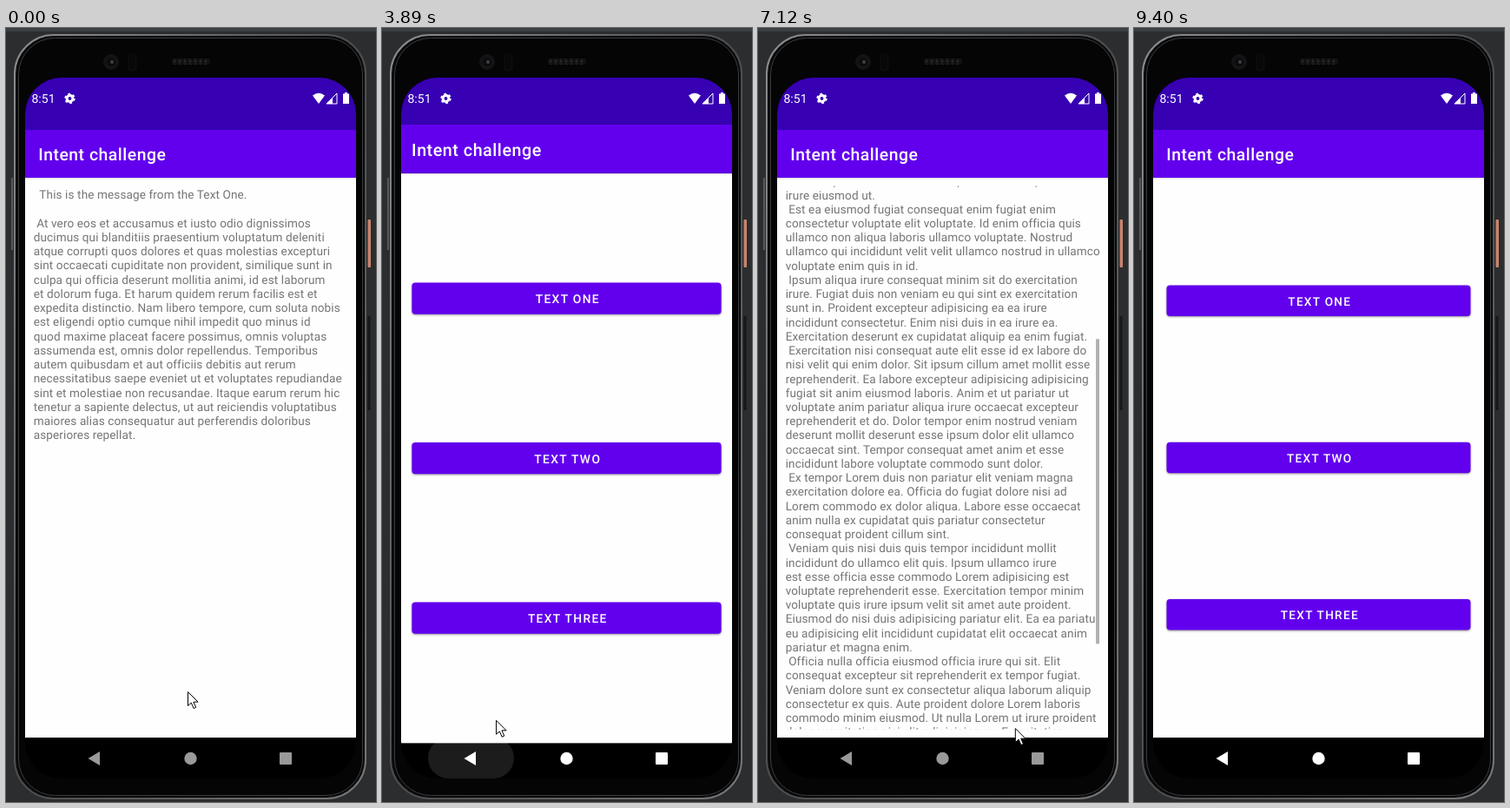
Write an HTML page that moves like this. It is 426 by 889 pixels and loops after 9680 ms.

```html
<!DOCTYPE html>
<html lang="en">
<head>
<meta charset="utf-8">
<style>
  html, body { margin: 0; height: 100%; overflow: hidden; background: #2b2d2f; }
  svg { display: block; width: 426px; height: 889px; }
  text { font-family: Roboto, sans-serif; white-space: pre; text-rendering: geometricPrecision; }
  .title { font-size: 19.4px; font-weight: 500; letter-spacing: .5px; fill: #fff; }
  .label { font-size: 13.6px; font-weight: 500; letter-spacing: .096em; fill: #fff; text-anchor: middle; }
  .body { font-size: 13.58px; letter-spacing: .1px; fill: #757575; }
  .button rect { fill: #6200ee; filter: drop-shadow(0 1px 1px #0006); }
  .pressed rect { fill: #893ff2; filter: drop-shadow(0 3px 3px #0006); }
</style>
</head>
<body>
<svg viewBox="0 0 426 889">
  <defs>
    <clipPath id="screen"><rect x="22" y="57" width="381" height="805" rx="42"/></clipPath>
    <clipPath id="viewport"><rect x="30" y="181.5" width="365" height="624"/></clipPath>
    <linearGradient id="rim" x2="1" y2="1">
      <stop stop-color="#8d8e90"/><stop offset=".5" stop-color="#4b4c4e"/><stop offset="1" stop-color="#77787a"/>
    </linearGradient>
    <linearGradient id="bar" x2="0" y2="1">
      <stop stop-color="#000" stop-opacity=".16"/><stop offset="1" stop-color="#000" stop-opacity="0"/>
    </linearGradient>
    <pattern id="mesh" width="6" height="4" patternUnits="userSpaceOnUse">
      <rect width="6" height="4" fill="#101010"/><circle cx="2" cy="2" r="1.5" fill="#282828"/>
    </pattern>
    <g id="chrome">
      <rect x="22" y="57" width="381" height="805"/>
      <rect x="22" y="172" width="381" height="643" fill="#fefefe"/>
      <rect x="22" y="57" width="381" height="60" fill="#3700b3"/>
      <rect x="22" y="117" width="381" height="55" fill="#6200ee"/>
      <rect x="22" y="172" width="381" height="2" fill="url(#bar)"/>
      <text class="title" x="37.2" y="152.3">Intent challenge</text>
    </g>
  </defs>

  <rect width="426" height="889" fill="#2b2d2f"/>
  <rect width="426" height="4" fill="#3c3f41"/>
  <path d="M7 172V255" stroke="#58595b" stroke-width="2"/>
  <rect x="416.5" y="331" width="3" height="108" rx="1" fill="#161718"/>
  <rect x="416.5" y="220" width="3.5" height="55" rx="1" fill="#c9826b"/>
  <rect x="10" y="8" width="404" height="877" rx="45" fill="#0a0a0b" stroke="url(#rim)" stroke-width="2"/>
  <rect x="14.5" y="11.5" width="396" height="870" rx="42" fill="#050506" stroke="#3b3c3e"/>
  <circle cx="121" cy="39" r="9" fill="#141415"/>
  <circle cx="121" cy="39" r="5" fill="#0b0c0e"/>
  <circle cx="122" cy="39" r="2" fill="#3b4247"/>
  <rect x="141" y="30" width="9" height="19" rx="4" fill="#080809" stroke="#111112"/>
  <rect x="191" y="35" width="44" height="7" rx="3" fill="url(#mesh)"/>

  <g clip-path="url(#screen)">
    <g id="pages"></g>
    <rect id="ripple" x="53" y="815" width="99" height="47" rx="23.5" fill="#fff"/>
    <g fill="#fff">
      <text x="29.5" y="86.3" font-size="14">8:51</text>
      <circle cx="73.5" cy="81" r="3.4" fill="none" stroke="#fff" stroke-width="3"/>
      <circle cx="73.5" cy="81" r="5.2" fill="none" stroke="#fff" stroke-width="2" stroke-dasharray="2.7 2.745"/>
      <path d="M353 77.5Q360 72 367 77.5L360 87Z"/>
      <path d="M381 75V87H369Z" fill="none" stroke="#fff"/>
      <path d="M376 80V87H369Z"/>
      <path d="M388 75.5H390V74H393V75.5H395V87H388Z"/>
    </g>
    <g id="nav">
      <path d="M94.5 839L108 831V847Z"/>
      <circle cx="212.5" cy="839" r="7.2"/>
      <rect x="315" y="832" width="14" height="14" rx="1"/>
    </g>
  </g>
  <path id="cursor" d="M0 0V16L3.8 12.6L6.6 19L9.2 17.8L6.4 11.6H11.6Z" fill="#fff" stroke="#000"/>
</svg>

<script>
const LOOP = 9680, LINE = 16.23, FADE = 450;
const $ = id => document.getElementById(id);

const texts = [
`  This is the message from the Text One.

 At vero eos et accusamus et iusto odio dignissimos
ducimus qui blanditiis praesentium voluptatum deleniti
atque corrupti quos dolores et quas molestias excepturi
sint occaecati cupiditate non provident, similique sunt in
culpa qui officia deserunt mollitia animi, id est laborum
et dolorum fuga. Et harum quidem rerum facilis est et
expedita distinctio. Nam libero tempore, cum soluta nobis
est eligendi optio cumque nihil impedit quo minus id
quod maxime placeat facere possimus, omnis voluptas
assumenda est, omnis dolor repellendus. Temporibus
autem quibusdam et aut officiis debitis aut rerum
necessitatibus saepe eveniet ut et voluptates repudiandae
sint et molestiae non recusandae. Itaque earum rerum hic
tenetur a sapiente delectus, ut aut reiciendis voluptatibus
maiores alias consequatur aut perferendis doloribus
asperiores repellat.`,
`  This is the message from the Text Two.

 Sed ut perspiciatis unde omnis iste natus error sit
voluptatem accusantium doloremque laudantium, totam
rem aperiam, eaque ipsa quae ab illo inventore veritatis
et quasi architecto beatae vitae dicta sunt explicabo.
Nemo enim ipsam voluptatem quia voluptas sit aspernatur
aut odit aut fugit, sed quia consequuntur magni dolores
eos qui ratione voluptatem sequi nesciunt. Neque porro
quisquam est, qui dolorem ipsum quia dolor sit amet,
consectetur, adipisci velit, sed quia non numquam eius
modi tempora incidunt ut labore et dolore magnam
aliquam quaerat voluptatem. Ut enim ad minima veniam,
quis nostrum exercitationem ullam corporis suscipit
laboriosam, nisi ut aliquid ex ea commodi consequatur.`,
` This is the message from the Text Three.

 Nostrud esse ex fugiat elit consequat deserunt et proident
quis eiusmod duis eiusmod officia.Tempor adipisicing quis
proident labore consectetur magna consequat sit et sit
officia proident excepteur pariatur. Incididunt ea ex pariatur
tempor officia dolor Lorem laborum in magna sint anim
commodo. Voluptate anim elit sunt anim aliqua ea aute.
Reprehenderit commodo fugiat ipsum ex sint aliqua aute
anim cupidatat excepteur eu. Duis voluptate quis esse non
consectetur deserunt amet. Ipsum velit esse duis amet
consectetur ad enim enim mollit.
 Exercitation id veniam laborum consequat aliqua
consequat irure proident pariatur ea magna est aliquip
cupidatat. Magna et eu minim duis proident sint est irure
adipisicing. Incididunt tempor adipisicing id eu exercitation
mollit proident tempor reprehenderit minim consequat
dolore velit eu. Sint irure adipisicing Lorem id dolor ea
cillum incididunt dolor nisi. Duis reprehenderit proident
est velit ipsum consectetur excepteur officia reprehenderit
irure eiusmod ut.
 Est ea eiusmod fugiat consequat enim fugiat enim
consectetur voluptate elit voluptate. Id enim officia quis
ullamco non aliqua laboris ullamco voluptate. Nostrud
ullamco qui incididunt velit velit ullamco nostrud in ullamco
voluptate enim quis in id.
 Ipsum aliqua irure consequat minim sit do exercitation
irure. Fugiat duis non veniam eu qui sint ex exercitation
sunt in. Proident excepteur adipisicing ea ea irure
incididunt consectetur. Enim nisi duis in ea irure ea.
Exercitation deserunt ex cupidatat aliquip ea enim fugiat.
 Exercitation nisi consequat aute elit esse id ex labore do
nisi velit qui enim dolor. Sit ipsum cillum amet mollit esse
reprehenderit. Ea labore excepteur adipisicing adipisicing
fugiat sit anim eiusmod laboris. Anim et ut pariatur ut
voluptate anim pariatur aliqua irure occaecat excepteur
reprehenderit et do. Dolor tempor enim nostrud veniam
deserunt mollit deserunt esse ipsum dolor elit ullamco
occaecat sint. Tempor consequat amet anim et esse
incididunt labore voluptate commodo sunt dolor.
 Ex tempor Lorem duis non pariatur elit veniam magna
exercitation dolore ea. Officia do fugiat dolore nisi ad
Lorem commodo ex dolor aliqua. Labore esse occaecat
anim nulla ex cupidatat quis pariatur consectetur
consequat proident cillum sint.
 Veniam quis nisi duis quis tempor incididunt mollit
incididunt do ullamco elit quis. Ipsum ullamco irure
est esse officia esse commodo Lorem adipisicing est
voluptate reprehenderit esse. Exercitation tempor minim
voluptate quis irure ipsum velit sit amet aute proident.
Eiusmod do nisi duis adipisicing pariatur elit. Ea ea pariatur
eu adipisicing elit incididunt cupidatat elit occaecat anim
pariatur et magna enim.
 Officia nulla officia eiusmod officia irure qui sit. Elit
consequat excepteur sit reprehenderit ex tempor fugiat.
Veniam dolore sunt ex consectetur aliqua laborum aliquip
consectetur ex quis. Aute proident dolore Lorem laboris
commodo minim eiusmod. Ut nulla Lorem ut irure proident
dolor exercitation nisi elit adipisicing ex. Exercitation
minim veniam aute sunt labore in ipsum.
 Culpa sint nostrud elit amet ea duis magna velit
tempor. Anim laboris et aliqua non cillum dolore irure
consequat. Quis enim proident ullamco ex do fugiat
officia mollit, sit nisi voluptate esse labore. Aliquip
incididunt Lorem ad minim pariatur eu tempor.
 Sunt reprehenderit qui deserunt ex amet commodo
laborum. Elit duis magna veniam occaecat nulla irure
cupidatat et dolor sint aliqua. Nisi velit excepteur
ad enim mollit.`];

// [open, close] of each message page
const visits = [[-1000, 950], [2378, 3760], [4800, 8800]];
const cursorPath = [[120, 209, 762], [420, 107, 850], [1200, 107, 850], [1800, 145, 580], [2110, 145, 580],
  [2300, 167, 500], [2500, 167, 500], [3070, 125, 826], [3200, 125, 826], [3480, 107, 850], [3720, 107, 850],
  [3890, 131, 795], [4170, 150, 725], [4320, 150, 725], [4600, 162, 693], [5100, 162, 695], [5250, 170, 806],
  [5480, 175, 822], [6050, 215, 400], [6490, 235, 400], [6850, 285, 624], [7120, 296, 804], [7480, 230, 824],
  [7600, 230, 824], [8020, 163, 843], [8400, 107, 851], [8800, 107, 851], [9300, 398, 880]];
const scrollPath = [[5480, 0], [6050, 420], [6490, 505], [6850, 505], [7120, 325], [7480, 90], [7600, 60], [8020, 6], [8300, 0]];

const clamp = v => Math.min(1, Math.max(0, v));
const ramp = (t, start, length) => clamp((t - start) / length);
const settle = p => 1 - (1 - p) ** 5;
const pulse = (t, start, end) => Math.min(ramp(t, start, 80), 1 - ramp(t, end, 200));

function along(path, t) {
  const i = path.findIndex(key => key[0] > t);
  if (i === 0) return path[0].slice(1);
  if (i < 0) return path.at(-1).slice(1);
  const [a, b] = [path[i - 1], path[i]], p = (t - a[0]) / (b[0] - a[0]);
  return a.slice(1).map((v, k) => v + (b[k + 1] - v) * p);
}

const button = (name, i) => {
  const y = 295.5 + i * 180.3;
  return `<g class="button"><rect x="37.5" y="${y}" width="350" height="35.5" rx="4"/>
    <text class="label" x="213.8" y="${y + 23}">${name}</text></g>`;
};
const message = text => `<g clip-path="url(#viewport)"><text class="body">${
  text.split('\n').map((line, i) => `<tspan x="31.7" y="${196.3 + i * LINE}">${line}</tspan>`).join('')}</text></g>`;
const page = content => `<g><use href="#chrome"/>${content}</g>`;

$('pages').innerHTML =
  page(['TEXT ONE', 'TEXT TWO', 'TEXT THREE'].map(button).join('')) +
  texts.map(text => page(message(text))).join('');
const [home, ...messages] = $('pages').children;
const buttons = home.querySelectorAll('.button');
const longText = messages[2].querySelector('text');
messages[2].insertAdjacentHTML('beforeend', '<rect id="thumb" x="389" width="4" height="350" fill="#b1b1b1"/>');

const show = (node, visible) => { node.style.display = visible ? '' : 'none'; };

function zoom(node, scale) {
  node.setAttribute('transform', `translate(212.5 459.5) scale(${scale}) translate(-212.5 -459.5)`);
}

function draw(t) {
  let homeScale = 1, covered = false;
  visits.forEach(([open, close], i) => {
    const entering = settle(ramp(t, open, FADE)), leaving = settle(ramp(t, close, FADE));
    const alpha = ramp(t, open + 20, 100) * (1 - ramp(t, close, 110));
    show(messages[i], alpha);
    messages[i].setAttribute('opacity', alpha);
    zoom(messages[i], .85 + .15 * entering - .1 * leaving);
    if (t >= close) homeScale = 1.1 - .1 * leaving;
    else if (t >= open) homeScale = 1 + .15 * entering;
    covered ||= alpha === 1 && entering > .95;
  });
  zoom(home, homeScale);
  show(home, !covered);
  buttons[1].classList.toggle('pressed', t > 2270 && t < 2700);
  buttons[2].classList.toggle('pressed', t > 4680 && t < 5200);

  const [scroll] = along(scrollPath, t);
  longText.setAttribute('transform', `translate(0 ${-scroll})`);
  $('thumb').setAttribute('y', 181.5 + scroll * .542);
  $('thumb').setAttribute('opacity', 1 - ramp(t, 8350, 250));

  const press = Math.max(pulse(t, 830, 1150), pulse(t, 3640, 3900), pulse(t, 8720, 8950));
  $('ripple').setAttribute('opacity', .11 * press);
  const dim = t < 830 || t > 2950 && t < 3640 || t > 5450 && t < 8720;
  $('nav').setAttribute('fill', dim ? '#999' : '#fff');

  $('cursor').setAttribute('transform', `translate(${along(cursorPath, t).map(v => v + .5)})`);
  show($('cursor'), t < 9350);
}

(function tick() {
  draw(performance.now() % LOOP);
  requestAnimationFrame(tick);
})();
</script>
</body>
</html>
```
